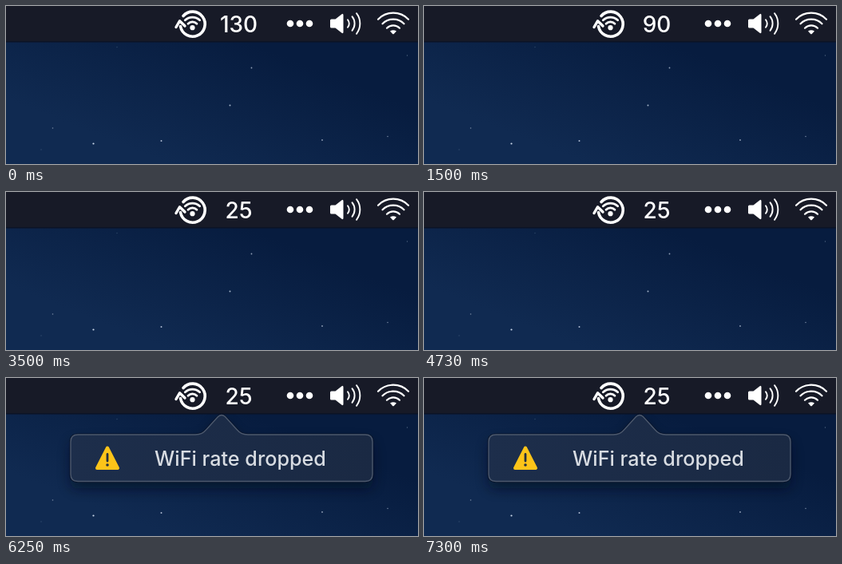
An HTML page for the animation above (8 s loop, 516 by 198 pixels).

```html
<!DOCTYPE html>
<html lang="en">
<head>
<meta charset="utf-8">
<title>Menu bar rate alert</title>
<style>
  html, body { margin: 0; width: 100%; height: 100%; overflow: hidden; background: #0b2146; }
  svg { display: block; width: 516px; height: 198px; }
  text { font-family: Inter, "Liberation Sans", sans-serif; font-weight: 500; text-anchor: middle; }
  #rate { font-size: 28px; fill: #fff; }
  #message { font-size: 25.2px; fill: #d8dce2; }
  .line { fill: none; stroke: #fff; stroke-linecap: round; stroke-linejoin: round; }
</style>
</head>
<body>
<svg viewBox="0 0 516 198">
  <defs>
    <linearGradient id="sky" gradientUnits="userSpaceOnUse" x1="290" y1="40" x2="225" y2="205">
      <stop offset="0" stop-color="#071c3f"/>
      <stop offset="1" stop-color="#102a51"/>
    </linearGradient>
    <linearGradient id="panel" x1="0" y1="0" x2="1" y2="0">
      <stop offset="0" stop-color="#1d2e4b"/>
      <stop offset="1" stop-color="#1a2943"/>
    </linearGradient>
    <filter id="shadow" x="-10%" y="-25%" width="120%" height="170%">
      <feGaussianBlur stdDeviation="8"/>
    </filter>
    <clipPath id="below"><rect y="45" width="516" height="153"/></clipPath>
    <path id="bubble" d="M90 71H237C244 71 247 69 251 64.5L265.5 48.5Q270 44.500 274.5 48.5L289 64.5C293 69 296 71 303 71H450Q459 71 459 80V120.500Q459 129.500 450 129.500H90Q81 129.500 81 120.500V80Q81 71 90 71Z"/>
  </defs>

  <rect width="516" height="198" fill="url(#sky)"/>
  <g id="stars" fill="#d8e4f4"></g>
  <rect width="516" height="45" fill="#171a27"/>
  <rect y="44" width="516" height="1.500" fill="#0c1325"/>

  <!-- refresh ring with signal -->
  <g class="line">
    <path d="M222 12.500A15.500 15.500 0 1 1 218.500 25.500" stroke-width="3.600"/>
    <path d="M213 26.500L217.500 18.800L224 25" stroke-width="3.400"/>
    <path d="M224.300 17.800A13.200 13.200 0 0 1 242.700 17.800" stroke-width="2.700"/>
    <path d="M228 22.200A7.800 7.800 0 0 1 239 22.200" stroke-width="2.700"/>
  </g>
  <circle cx="233.500" cy="27.200" r="3.100" fill="#fff"/>

  <text id="rate" x="291.500" y="32.500"></text>

  <g fill="#fff">
    <circle cx="356" cy="22" r="4.300"/>
    <circle cx="368" cy="22" r="4.300"/>
    <circle cx="380" cy="22" r="4.300"/>
    <path d="M407.500 16.500H412.500L420.500 10.200Q422.500 9 422.500 11.500V32.500Q422.500 35 420.500 33.800L412.500 27.500H407.500Q406 27.500 406 26V18Q406 16.500 407.500 16.500Z"/>
    <path d="M481 31.500Q485 28.800 489 31.500L485.800 34.900Q485 35.700 484.200 34.900Z"/>
  </g>
  <g class="line" stroke-width="1.900">
    <path d="M428 17.200A8 8 0 0 1 428 26.800"/>
    <path d="M433.500 13.200A14 14 0 0 1 433.500 30.800"/>
    <path d="M439 9.200A21 21 0 0 1 439 34.800"/>
  </g>
  <g class="line" stroke-width="2.200">
    <path d="M466 16.700A26.500 26.500 0 0 1 504 16.700"/>
    <path d="M471.500 22.300A19 19 0 0 1 498.500 22.300"/>
    <path d="M477 27.700A11.500 11.500 0 0 1 493 27.700"/>
  </g>

  <g id="alert" visibility="hidden">
    <g clip-path="url(#below)">
      <use href="#bubble" y="9" fill="#020a1b" opacity=".6" filter="url(#shadow)"/>
    </g>
    <use href="#bubble" fill="none" stroke="#07132a" stroke-width="3"/>
    <use href="#bubble" fill="url(#panel)" stroke="#4c596e" stroke-width="1.400"/>
    <path d="M127 87.500L140 113H114Z" fill="#fcc419" stroke="#fcc419" stroke-width="4" stroke-linejoin="round"/>
    <path d="M127 95.500V104" stroke="#25303f" stroke-width="2.800" stroke-linecap="round"/>
    <circle cx="127" cy="109" r="1.800" fill="#25303f"/>
    <text id="message" x="293.500" y="110">WiFi rate dropped</text>
  </g>
</svg>
<script>
  const LOOP = 8000;
  const steps = [
    { at: 0, rate: 130 },
    { at: 1500, rate: 90 },
    { at: 3500, rate: 25 },
    { at: 5550, rate: 25, alert: true }
  ];
  // x, y, radius, opacity
  const stars = [
    [109.5, 172.5, 1.1, .95], [194.5, 169, 1, .8], [280.5, 124.5, 1, .75],
    [307.5, 77.5, .9, .65], [396, 168, .9, .65], [478, 163.5, .8, .5],
    [58.5, 153, .8, .5], [502.5, 62, .7, .35], [139, 51.5, .7, .2], [44, 180, .7, .2]
  ];

  const find = id => document.getElementById(id);
  const rate = find("rate"), alertBox = find("alert");

  for (const [cx, cy, r, opacity] of stars) {
    const star = document.createElementNS("http://www.w3.org/2000/svg", "circle");
    for (const [key, value] of Object.entries({ cx, cy, r, opacity })) star.setAttribute(key, value);
    find("stars").append(star);
  }

  let shown;
  function draw(time) {
    const step = steps.findLast(s => s.at <= time % LOOP);
    if (step === shown) return;
    shown = step;
    rate.textContent = step.rate;
    alertBox.setAttribute("visibility", step.alert ? "visible" : "hidden");
  }

  const start = performance.now();
  function tick() {
    draw(performance.now() - start);
    requestAnimationFrame(tick);
  }
  tick();
</script>
</body>
</html>
```
